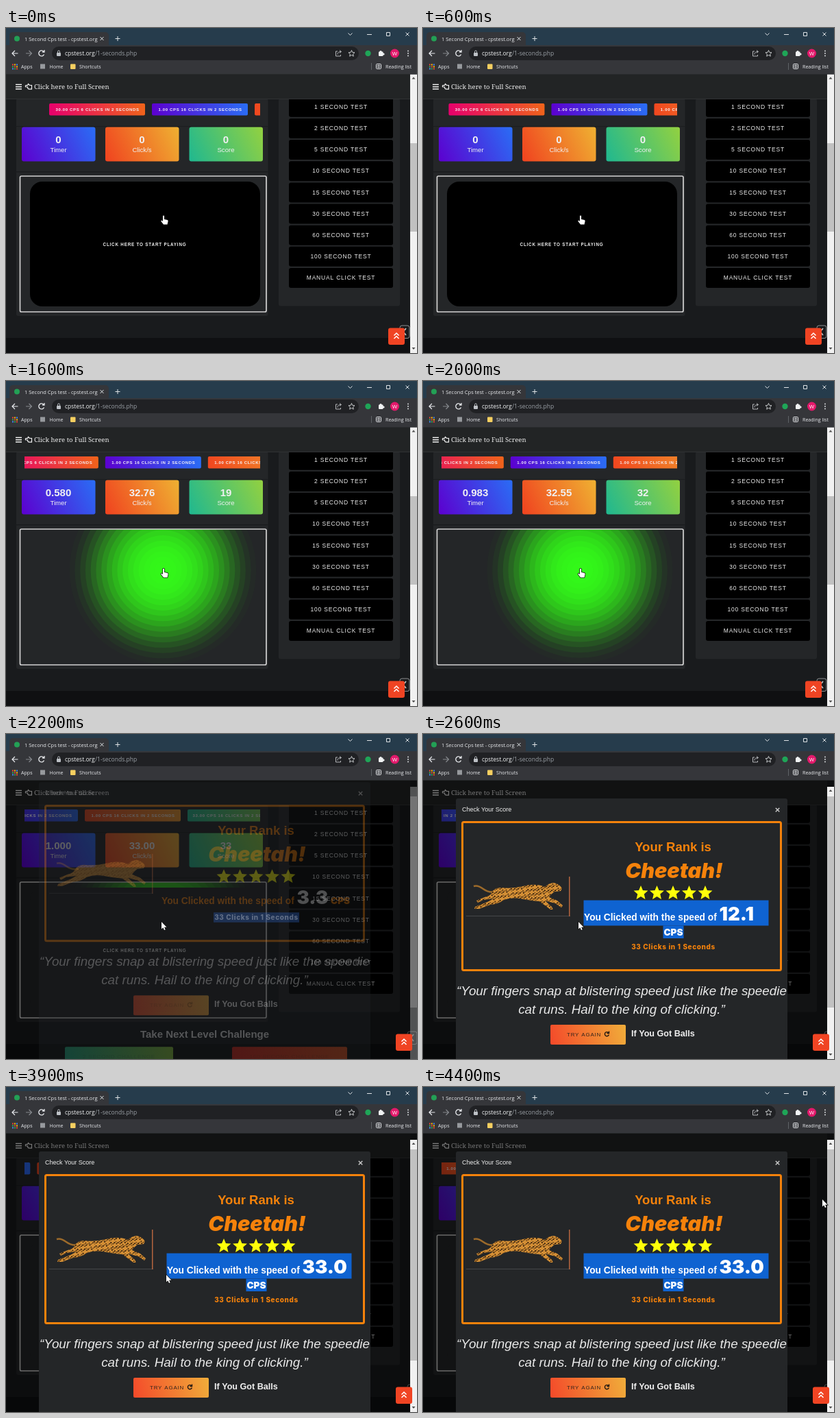
Animation, 600 px wide and 474 px high, one loop 4.5 s. Source, as an HTML page with a canvas:

```html
<!DOCTYPE html>
<html lang="en">
<head>
<meta charset="utf-8">
<title>Click speed test</title>
<style>
html, body { margin: 0; width: 600px; height: 474px; overflow: hidden; background: #191b1d; }
canvas { display: block; }
</style>
</head>
<body>
<canvas id="stage" width="600" height="474"></canvas>
<script>
const c = document.getElementById('stage').getContext('2d');
const LOOP = 4500, STEP = 100, START = 1024.6, END = 2016.7, OPEN = 2050, FADE = 2155;
const ORANGE = '#f5820b', PANEL = '#242628';
const SANS = '"Liberation Sans", Arial, sans-serif', UI = '"Open Sans", sans-serif', BLACK = 'Inter, sans-serif';
const clamp = (v, a = 0, b = 1) => Math.min(b, Math.max(a, v));

function rect(x, y, w, h, fill, r = 0) {
  c.fillStyle = fill;
  c.beginPath();
  c.roundRect(x, y, w, h, r);
  c.fill();
}
function frame(x, y, w, h, color, line, r = 0) {
  c.strokeStyle = color;
  c.lineWidth = line;
  c.beginPath();
  c.roundRect(x, y, w, h, r);
  c.stroke();
}
function disc(x, y, r, fill) {
  c.fillStyle = fill;
  c.beginPath();
  c.arc(x, y, r, 0, 7);
  c.fill();
}
function lines(d, color, width = 1) {
  c.strokeStyle = color;
  c.lineWidth = width;
  c.stroke(new Path2D(d));
}
function text(s, x, y, font, color, align = 'left', gap = 0) {
  c.font = font;
  c.fillStyle = color;
  c.textAlign = align;
  c.letterSpacing = gap + 'px';
  c.fillText(s, x, y);
}
function gradient(x, y, w, h, [from, to]) {
  const g = c.createLinearGradient(x, y + h, x + w, y);
  g.addColorStop(0, from);
  g.addColorStop(1, to);
  return g;
}
const slab = (x, y, w, h, colors, r = 3) => rect(x, y, w, h, gradient(x, y, w, h, colors), r);
function clipped(x, y, w, h, draw) {
  c.save();
  c.beginPath();
  c.rect(x, y, w, h);
  c.clip();
  draw();
  c.restore();
}

const PURPLE = ['#5c00cf', '#2a6df5'], FIRE = ['#f0421f', '#efb132'],
      GREEN = ['#1fb890', '#93d140'], PINK = ['#e6006c', '#f0641a'];

function browser() {
  rect(0, 0, 600, 25, '#263c4c');
  rect(5, 6, 145, 24, '#35363a', 5);
  rect(0, 25, 600, 42.5, '#35363a');
  disc(16, 15.5, 4, '#23a055');
  text('1 Second Cps test - cpstest.org', 27, 18.5, '7.5px ' + UI, '#e8eaed');
  lines('M137.500 13l5 5m0-5l-5 5M159.500 15.500h7m-3.500-3.500v7', '#dfe3e6');
  lines('M499.500 7.500l3 3l3-3M527 9.500h7M555.500 6.500h5v5h-5zM583.500 6.500l5 5m0-5l-5 5', '#dfe3e6');

  rect(67, 27, 448, 20, '#202124', 10);
  lines('M17.500 37h-8m3.500-4l-4 4l4 4', '#e8eaed', 1.2);
  lines('M29 37h8m-3.500-4l4 4l-4 4', '#85888c', 1.2);
  lines('M55 34.500a4 4 0 1 0 .5 4M56 32v3h-3', '#e8eaed', 1.3);
  rect(74, 36, 6, 5, '#bdc1c6', 1);
  lines('M75.500 36v-1.500a1.500 1.500 0 0 1 3 0v1.500', '#bdc1c6');
  text('cpstest.org', 86, 40, '8.5px ' + UI, '#f1f3f4');
  text('/1-seconds.php', 130, 40, '8.5px ' + UI, '#9aa0a6');
  lines('M484 34h-2.500v7h7v-2M484 38.500q0-4 5-4m-2-2l2.500 2l-2.500 2', '#c4c7ca', .9);
  lines('M504.500 32.500l1.300 3l3.200.3l-2.400 2.200l.7 3.200l-2.800-1.700l-2.800 1.700l.7-3.200l-2.400-2.200l3.200-.3z', '#d5d8da', .9);
  disc(528.500, 37, 4.2, '#1fa557');
  rect(544, 34.500, 6.5, 6.5, '#f1f3f4', 1);
  disc(547, 34.500, 1.6, '#f1f3f4');
  disc(551, 38, 1.6, '#f1f3f4');
  disc(567.500, 37, 6.5, '#e3196b');
  text('W', 567.500, 40, '8px ' + UI, '#fff', 'center');
  for (const y of [33.5, 37, 40.5]) disc(587, y, .9, '#e8eaed');

  const dots = ['#ea4335', '#fbbc05', '#4285f4', '#34a853'];
  for (let i = 0; i < 9; i++) rect(9 + i % 3 * 3, 52.500 + (i / 3 | 0) * 3, 2, 2, dots[i % 4]);
  rect(50, 52.500, 7, 7, '#96999d');
  rect(94, 52.500, 7.5, 7.5, '#f6cf60', 1);
  const mark = '7.1px ' + UI;
  text('Apps', 22, 59, mark, '#e8eaed');
  text('Home', 63.500, 59, mark, '#e8eaed');
  text('Shortcuts', 107, 59, mark, '#e8eaed');
  text('Reading list', 554, 59, mark, '#e8eaed');
  lines('M533.500 51v10', '#5f6368');
  frame(540.500, 52.500, 7, 7, '#e8eaed', 1, 1);
  lines('M542 54.500h4M542 56h4M542 57.500h4', '#e8eaed', .8);
}

function chips(t) {
  const x = t < END ? 63 - .0426 * t : -185 - .041 * (t - 2200);
  const list = [['30.00 CPS 6', PINK], ['1.00 CPS 16', PURPLE], ['1.00 CPS 16', ['#f0461f', '#f09a2c']], ['33.00 CPS 16', GREEN]];
  clipped(27, 104, 344, 30, () => list.forEach(([label, colors], i) => {
    slab(x + i * 150, 110, 140, 17.5, colors, 2);
    text(label + ' CLICKS IN 2 SECONDS', x + i * 150 + 70.500, 121.300, 'bold 6px ' + SANS, '#f4f1f6', 'center', .65);
  }));
}

function tiles(t) {
  const secs = clamp((t - START) / (END - START));
  const score = secs ? 1 + Math.floor(32 * secs) : 0;
  const rows = [
    ['Timer', secs ? secs.toFixed(3) : '0', PURPLE, 23],
    ['Click/s', secs ? (score / secs.toFixed(3)).toFixed(2) : '0', FIRE, 145],
    ['Score', score, GREEN, 267.5]];
  for (const [label, value, colors, x] of rows) {
    slab(x, 144.500, 107.5, 50, colors);
    text(value, x + 53.500, 167.500, 'bold 15px ' + SANS, '#f0f0f2', 'center');
    text(label, x + 53.500, 181, '9.6px ' + SANS, '#f0f0f2', 'center');
  }
}

function game(t) {
  clipped(21, 216, 359, 198, () => {
    for (let i = 0; i < 33; i++) {
      const age = t - START - i * 31;
      if (age > 30 && age < 600) disc(229, 276, .25 * (age - 30), `rgba(52,250,26,${.46 * (1 - age / 600)})`);
    }
  });
  frame(20.500, 216, 359.5, 198, '#d2d2d2', 1.7, 2);
  if (t >= START && t < END) return;
  rect(35, 224, 336, 182, t < START ? '#000' : PANEL, 18);
  text('CLICK HERE TO START PLAYING', 202.500, 317.500, 'bold 6.3px ' + SANS, '#f0f0f0', 'center', .8);
}

function page(t) {
  rect(0, 67.500, 600, 407, '#191b1d');
  rect(0, 452, 600, 22, '#0f1012');
  rect(15, 103, 367.5, 317, PANEL, 3);
  rect(398, 103, 177, 302.5, PANEL, 3);
  rect(15, 143, 367.5, 1, '#1b1d1f');
  rect(15, 209, 367.5, 1.5, '#1b1d1f');
  chips(t);
  tiles(t);
  game(t);
  const names = [1, 2, 5, 10, 15, 30, 60, 100].map(n => n + ' SECOND TEST').concat('MANUAL CLICK TEST');
  names.forEach((name, i) => {
    const y = 115.300 + i * 31.15;
    rect(413, y - 14.500, 152, 29, '#000', 3);
    text(name, 489, y + 2.700, '8.5px ' + SANS, '#ececec', 'center', .8);
  });
  rect(0, 67.500, 590, 36, '#222425');
  rect(0, 103, 590, 1, '#303234');
  lines('M14 82.500h9M14 85.700h9M14 88.900h9', '#f0f0f0', 1.5);
  lines('M37.500 83.500h-3l-2-2l-1 2.200h-2.500q-1.300 1.200 0 2.300h2.500q0 3.200 2.500 3.200h3.500z', '#f0f0f0', 1.2);
  text('Click here to Full Screen', 41, 89, '9.5px "Noto Serif", serif', '#ededed');
}

function scrollbar(top, thumbTop, thumbEnd) {
  rect(590, top, 10, 474 - top, '#f1f1f1');
  rect(590, thumbTop, 10, thumbEnd - thumbTop, '#c1c1c1');
  c.fillStyle = '#505050';
  c.fill(new Path2D(`M592.500 ${top + 7}h5l-2.500-3zM592.500 466h5l-2.500 3z`));
}

const BODY = new Path2D('M100 232Q104 224 114 224Q130 226 146 222Q164 217 178 223Q184 217 191 217Q198 218 203 225L201 229L192 230Q187 233 184 238L196 243L204 250L202 253L193 247L178 243L188 252L190 256L186 256L170 244Q156 243 142 240Q128 238 118 242Q110 248 98 249L82 255L75 255L76 252L94 245L103 240L88 242L80 246L78 243L90 238Q98 236 100 232Z');
function cheetah() {
  lines('M106 230Q96 232 88 226T74 222', '#9c6a2a', 2.5);
  c.save();
  c.fillStyle = '#d48f35';
  c.fill(BODY);
  c.clip(BODY);
  for (let i = 0; i < 480; i++) {
    const x = 74 + i * .618034 % 1 * 130, y = 216 + i * .754878 % 1 * 41;
    disc(x, y, .7 + i % 3 * .2, '#2c1a0c');
  }
  c.restore();
  rect(63, 265, 152, 1, '#45474a');
  rect(213, 208, 1.5, 58, '#b5643f');
}

function star(x, y) {
  c.fillStyle = '#ffff0a';
  c.beginPath();
  for (let i = 0; i < 10; i++) {
    const a = i * Math.PI / 5 - Math.PI / 2, r = i % 2 ? 5 : 11;
    c.lineTo(x + r * Math.cos(a), y + r * Math.sin(a));
  }
  c.fill();
}

function modal(t) {
  const count = clamp((t - OPEN) * .022, 0, 33), wide = count >= 10;
  const cut = wide ? 0 : 19;
  c.save();
  c.globalAlpha = clamp((t - FADE) / 150);
  scrollbar(77, 91, 399);
  c.translate(0, -33 * (1 - clamp((t - FADE) / 300)) ** 2);
  rect(48, 94, 484, 420, PANEL, 3);
  text('Check Your Score', 57, 112.500, '9px ' + SANS, '#f0f0f0');
  text('×', 517.500, 114.500, 'bold 13px ' + SANS, '#c9c9c9', 'center');
  frame(57.500, 128.500, 465, 216 - cut, ORANGE, 3, 2);
  c.save();
  c.translate(0, -cut / 2);
  cheetah();
  c.restore();
  text('Your Rank is', 365, 170.500, 'bold 18.5px ' + SANS, ORANGE, 'center');
  text('Cheetah!', 366.500, 210, 'italic 900 30.5px ' + BLACK, ORANGE, 'center');
  for (let i = 0; i < 5; i++) star(318 + i * 23.500, 232);

  const speed = 'You Clicked with the speed of', bold = 'bold 13.75px ' + SANS;
  const big = '900 27.5px ' + BLACK, unit = '900 13.6px ' + BLACK, small = '800 10px ' + BLACK;
  if (wide) {
    rect(234.500, 242.500, 270, 37, '#0f63d1');
    rect(350.500, 279.500, 30, 18.5, '#0f63d1');
    text(speed, 235, 272, bold, '#fff');
    text(count.toFixed(1), 432.500, 272, big, '#fff');
    text('CPS', 365.500, 294, unit, '#fff', 'center');
  } else {
    rect(303, 284, 125, 14.5, '#2f6ad8');
    text(speed, 227, 272, bold, ORANGE);
    text(count.toFixed(1), 424.500, 272, big, '#f2f2f2');
    text('CPS', 474, 272, unit, ORANGE);
  }
  text('33 Clicks in 1 Seconds', 365.500, 313.500 - cut, small, wide ? ORANGE : '#fff', 'center', .6);

  c.translate(0, -cut);
  const quote = 'italic 18.85px ' + SANS;
  text('“Your fingers snap at blistering speed just like the speedie', 290, 381, quote, '#e9e9e9', 'center');
  text('cat runs. Hail to the king of clicking.”', 290, 407.500, quote, '#e9e9e9', 'center');
  slab(186, 424, 110, 29, ['#f4492a', '#f0ad3a'], 2);
  text('TRY AGAIN', 210, 441, '8px ' + SANS, '#33241c', 'left', .8);
  lines('M270.500 435.500a3 3 0 1 0 .8 3M271.500 433.500v3h-3', '#1c1512', 1.4);
  text('If You Got Balls', 304, 440.500, 'bold 12.6px ' + SANS, '#f0f0f0');
  text('Take Next Level Challenge', 290, 486, 'bold 15px ' + SANS, '#f0f0f0', 'center');
  slab(86, 499, 158, 29, GREEN, 2);
  slab(330, 499, 168, 29, ['#e8251c', '#f0561f'], 2);
  text('2 SECOND CHALLENGE', 165, 515.500, '8px ' + SANS, '#20302a', 'center', .8);
  text('100 SECOND CHALLENGE', 414, 515.500, '8px ' + SANS, '#33201c', 'center', .8);
  c.restore();
}

function sideTab(x) {
  frame(x, 434, 14, 18.5, '#8d8f91', 1, 3);
  lines(`M${x + 9} 438l-4 5l4 5`, '#c8c8c8', 1.6);
}
function topButton(x) {
  rect(x, 437.500, 24, 24.5, '#f04423', 3);
  lines(`M${x + 8.5} 448.500l3.500-3.500l3.500 3.500M${x + 8.5} 453l3.500-3.500l3.500 3.500`, '#fff', 1.5);
}

function cursor(t) {
  c.save();
  let shape;
  if (t < END) {
    c.translate(230, 274);
    shape = new Path2D('M-1 0Q0-1 1 0V5L5.500 6Q7 6.500 6.500 8L5.500 12.500H0L-3.500 8Q-4 6.500-2.500 6.800L-1 8Z');
  } else {
    const drift = clamp((t - 2900) / 400), sweep = clamp((t - 4100) / 300) ** 1.5;
    c.translate(227 + 7 * drift + 349 * sweep, 274 - 110 * sweep);
    shape = new Path2D('M0 0V10.500L2.300 8.300L4 12L5.700 11.200L4.100 7.700H7.500Z');
  }
  c.lineWidth = 1.4;
  c.strokeStyle = '#111';
  c.stroke(shape);
  c.fillStyle = '#fff';
  c.fill(shape);
  c.restore();
}

function draw(t) {
  const open = t >= OPEN;
  page(t);
  if (open) {
    rect(590, 67.500, 10, 407, '#191b1d');
    sideTab(586);
    rect(0, 67.500, 600, 407, `rgba(0,0,0,${.5 * clamp((t - OPEN) / 150)})`);
    modal(t);
  } else {
    sideTab(575);
    scrollbar(67.500, 168, 297);
  }
  topButton(open ? 569 : 558);
  browser();
  cursor(t);
}

function tick(now) {
  draw(Math.floor(now % LOOP / STEP) * STEP);
  requestAnimationFrame(tick);
}
requestAnimationFrame(tick);
</script>
</body>
</html>
```
